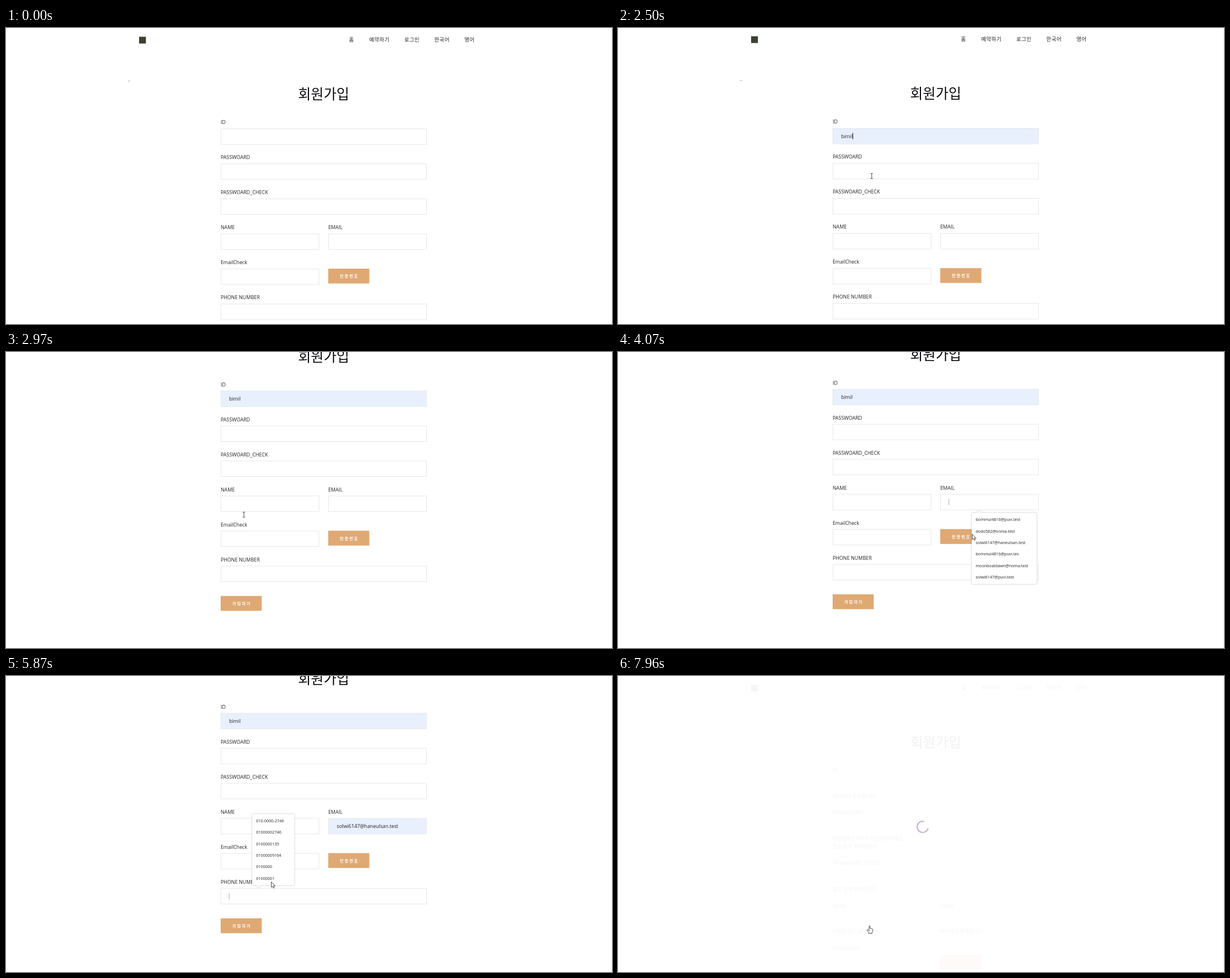
Recreate the animation shown at these times as an HTML page. Size 1070 by 524 pixels, loop 8 s.

```html
<!DOCTYPE html>
<html lang="ko">
<head>
<meta charset="utf-8">
<title>회원가입</title>
<style>
  html, body { margin: 0; width: 100%; height: 100%; overflow: hidden; background: #fff; }
  svg { display: block; width: 1070px; height: 524px; }
  text { font: 8.75px "Open Sans", "Noto Sans", "Noto Sans CJK KR", "Noto Sans CJK", sans-serif; fill: #222; white-space: pre; }
  .ko { font-family: "Noto Sans CJK KR", "Noto Sans CJK", sans-serif; }
  .title { font-size: 24.5px; font-weight: 350; fill: #0c0c10; text-anchor: middle; }
  .nav { font-size: 9.3px; font-weight: 350; letter-spacing: .45px; }
  .btn { font-size: 7.3px; font-weight: 700; letter-spacing: 1.7px; fill: #fff; text-anchor: middle; }
  .item { font-size: 7.1px; }
  .popup { filter: drop-shadow(0 .7px 1px rgba(0, 0, 0, .32)); }
</style>
</head>
<body>
<svg id="stage" viewBox="0 0 1070 524"></svg>
<script>
const LOOP = 8000, ROW = 20.3, RELOAD = 7570, BLINK = 530;
const stage = document.getElementById('stage');

function add(parent, tag, attrs = {}, label) {
  const el = document.createElementNS('http://www.w3.org/2000/svg', tag);
  set(el, attrs);
  if (label !== undefined) el.textContent = label;
  parent.appendChild(el);
  return el;
}
function set(el, attrs) {
  for (const k in attrs) el.setAttribute(k, attrs[k]);
}
function show(el, on) {
  el.style.display = on ? '' : 'none';
}
const group = parent => add(parent, 'g');
const write = (parent, x, y, label, cls = '') => add(parent, 'text', { x, y, class: cls }, label);

function header(parent) {
  add(parent, 'rect', { x: 235, y: 15.5, width: 12, height: 12, fill: '#39432f' });
  const nav = [[605.6, '홈'], [641.2, '예약하기'], [703.2, '로그인'], [756.2, '한국어'], [809.5, '영어']];
  for (const [x, label] of nav) write(parent, x, 24.2, label, 'ko nav');
  write(parent, 560.9, 126.2, '회원가입', 'ko title');
}

function button(parent, x, y, label) {
  add(parent, 'rect', { x, y, width: 72.5, height: 26.3, fill: '#dfa974' });
  write(parent, x + 37.2, y + 16.2, label, 'ko btn');
}

function field(parent, x, y, width, label) {
  write(parent, x, y - 7.8, label);
  const box = add(parent, 'rect', {
    x: x + .5, y: y + .5, width, height: 27.6, fill: '#fff', stroke: '#e7e7e7'
  });
  const value = write(parent, x + 15, y + 17.6, '');
  const caret = add(parent, 'rect', { x: x + 14.6, y: y + 8.5, width: 1, height: 11.5 });
  show(caret, false);
  return { x, box, value, caret };
}

// Sign-up form
const page = group(stage);
header(page);
add(page, 'rect', { x: 216.5, y: 93.2, width: 1.4, height: 1.4, fill: '#777' });
const idField = field(page, 379, 178, 363, 'ID');
field(page, 379, 240, 363, 'PASSWOARD');
field(page, 379, 302, 363, 'PASSWOARD_CHECK');
field(page, 379, 364, 173, 'NAME');
const emailField = field(page, 569, 364, 173, 'EMAIL');
field(page, 379, 426, 173, 'EmailCheck');
const phoneField = field(page, 379, 488, 363, 'PHONE NUMBER');
button(page, 569, 426, '인증번호');
button(page, 379, 541.5, '가입하기');

// Reloaded page, almost hidden by the white preloader
const reloaded = group(stage);
const faint = add(reloaded, 'g', { opacity: .05 });
header(faint);
const notes = [
  [379, 170, 'ID'], [379, 216, '아이디가 중복됩니다'], [379, 245, 'PASSWOARD'],
  [379, 291, '비밀번호는 8자리 이상 입력하세요'], [379, 305, '필수 입력 항목입니다'],
  [379, 334, 'PASSWOARD_CHECK'], [379, 380, '필수 입력 항목입니다'],
  [379, 410, 'NAME'], [569, 410, 'EMAIL'],
  [379, 455, '이름은 필수 항목입니다'], [569, 455, '이메일이 중복됩니다'],
  [379, 485, 'EmailCheck']
];
for (const n of notes) write(faint, ...n);
button(faint, 569, 494, '인증번호');
const ring = add(reloaded, 'circle', {
  r: 9.9, fill: 'none', 'stroke-width': 2.2, pathLength: 4, 'stroke-dasharray': '3 1'
});

add(stage, 'rect', { x: 1069, y: 0, width: 1, height: 524, fill: '#f1f1f1' });

// Autocomplete lists
function popup(opts) {
  const { x, y, width, rows, arrowY } = opts;
  const g = add(stage, 'g', { class: 'popup' });
  const height = rows.length * ROW + 4.6, dir = arrowY > y + height / 2 ? 4 : -4;
  add(g, 'rect', { x, y, width, height, rx: 2, fill: '#fff' });
  add(g, 'path', { d: `M${x + 7} ${arrowY}h10l-5 ${dir}z`, fill: '#fff' });
  const hover = add(g, 'rect', { x, width, height: ROW, fill: '#e8e8e8' });
  rows.forEach((r, i) => write(g, x + 7, y + 14.9 + i * ROW, r, 'item'));
  return { ...opts, g, hover, top: y + 2 };
}
const lists = [
  popup({
    field: idField, open: 1080, close: 1880, pick: 0, blinkFrom: 2100,
    x: 434.5, y: 211.5, width: 75, arrowY: 211.7,
    rows: ['bimil', 'bimil2', 'bimil12']
  }),
  popup({
    field: emailField, open: 3830, close: 4900, pick: 2, blinkFrom: 4900,
    x: 624.5, y: 284.4, width: 115, arrowY: 284.6,
    rows: ['bommul4816@puvi.test', 'dodo582@noma.test', 'solwi6147@haneulsan.test',
      'bommul4816@puvi.tes', 'moonboatdawn@noma.test', 'solwi6147@puvi.test']
  }),
  popup({
    field: phoneField, open: 5400, close: 6850, pick: 1, blinkFrom: 6850,
    x: 434.5, y: 244.2, width: 74.7, arrowY: 370.4,
    rows: ['010-0000-2746', '01000002746', '0100000135', '01000009164', '0100000', '01000001']
  })
];

// Pointer
const glow = add(stage, 'circle', { r: 8.3, fill: '#f5e51b', opacity: .8 });
const shapes = {
  arrow: 'M0 0V9.6L2.2 7.6L3.7 11L5.2 10.3L3.8 7.1H6.7Z',
  beam: 'M-2 -4.5H-.7L0 -4L.7 -4.5H2M0 -4V4M-2 4.5H-.7L0 4L.7 4.5H2',
  hand: 'M-.9 .3Q0 -.8 .9 .3V4.5Q2 3.8 2.6 4.8Q3.7 4.2 4.2 5.2Q5.6 4.8 5.6 6.4V9.2L4.4 11.2V13H-1.6V11.6L-4.6 7.4Q-4.4 5.6 -2.4 7L-.9 8.4Z'
};
const pointer = add(stage, 'path', { 'stroke-linejoin': 'round' });

// time, x, y, shape from then on
const path = [
  [370, 849, 498, 'arrow'], [620, 700, 380, 'arrow'], [880, 500, 218, 'arrow'],
  [1010, 452, 193, 'beam'], [1200, 452, 193, 'beam'],
  [1390, 455, 222, 'arrow'], [2080, 455, 222, 'beam'],
  [2500, 448, 262, 'beam'], [2840, 424, 286, 'beam'], [2970, 420, 288, 'beam'],
  [3150, 425, 287, 'arrow'], [3600, 637, 268, 'beam'], [3840, 637, 268, 'arrow'],
  [3980, 620, 300, 'arrow'], [4070, 625.5, 322.5, 'arrow'], [4340, 655, 336, 'arrow'],
  [4960, 655, 336, 'arrow'], [5280, 455, 390, 'beam'], [5610, 455, 390, 'arrow'],
  [5700, 466, 422, 'arrow'], [5870, 468.5, 364.5, 'arrow'], [6410, 463, 292, 'arrow'],
  [6480, 463, 292, 'arrow'], [6580, 460.5, 273.5, 'arrow'], [6820, 460.5, 273.5, 'arrow'],
  [7250, 444.2, 442.5, 'hand']
];
const scroll = [[2440, 0], [2500, .7], [2600, 22], [2720, 68], [2840, 99], [2970, 109.6], [3060, 112.5]];
const clicks = [[1060, 1180], [1790, 1900], [3790, 3900], [4820, 4930], [5370, 5480], [6600, 6800], [7340, 7450]];

const within = (t, a, b) => t >= a && t < b;
const lerp = (a, b, u) => a + (b - a) * u;
const smooth = u => u * u * (3 - 2 * u);

function sample(keys, t, ease) {
  if (t <= keys[0][0]) return keys[0].slice(1);
  const i = keys.findIndex(k => k[0] > t);
  if (i < 0) return keys[keys.length - 1].slice(1);
  const a = keys[i - 1], b = keys[i];
  const u = ease((t - a[0]) / (b[0] - a[0]));
  return a.slice(1).map((v, j) => typeof v === 'number' ? lerp(v, b[j + 1], u) : v);
}

// The highlight lags a little behind the pointer
function hoverRow(list, t) {
  const [x, y, shape] = sample(path, t - 60, smooth);
  const row = Math.floor((y - list.top) / ROW);
  const inside = shape === 'arrow' && x > list.x + 2 && x < list.x + list.width;
  return inside && row >= 0 && row < list.rows.length ? row : -1;
}

function drawList(list, i, t) {
  const { field: f, rows, open, close, blinkFrom } = list;
  const isOpen = within(t, open, close), done = t >= close;
  const row = isOpen ? hoverRow(list, t) : -1;
  show(list.g, isOpen);
  show(list.hover, row >= 0);
  if (row >= 0) set(list.hover, { y: list.top + row * ROW });

  const filled = done || row >= 0;
  f.value.textContent = done ? rows[list.pick] : rows[row] || '';
  f.value.style.fontSize = done ? '' : '7.35px';
  set(f.box, { fill: filled ? '#e8f0fe' : '#fff' });

  const next = lists[i + 1];
  const focused = t >= open && (!next || t < next.open);
  const since = t - (done ? blinkFrom : open);
  show(f.caret, focused && (since < 0 || Math.floor(since / BLINK) % 2 === 0));
  const end = done ? f.value.getComputedTextLength() : -.4;
  set(f.caret, { x: f.x + 15 + end, fill: filled ? '#222' : '#aaa' });
}

function drawRing(t) {
  const turn = Math.max(0, t - 7627) / 800 % 1;
  const u = 1 - Math.abs(1 - 2 * turn);
  const color = [[244, 103], [67, 58], [54, 183]].map(([a, b]) => Math.round(lerp(a, b, u)));
  set(ring, {
    stroke: `rgb(${color})`,
    opacity: lerp(1, .4, Math.min(1, Math.max(0, (t - 7730) / 230))),
    transform: `translate(538 267) rotate(${225 + turn * 360})`
  });
}

function drawPointer(t) {
  const [x, y, shape] = sample(path, t, smooth);
  const beam = shape === 'beam';
  show(pointer, t >= 370);
  set(pointer, {
    d: shapes[shape], transform: `translate(${x} ${y})`,
    fill: beam ? 'none' : '#fff', stroke: beam ? '#333' : '#222',
    'stroke-width': beam ? .9 : .8
  });
  show(glow, clicks.some(c => within(t, ...c)));
  set(glow, { cx: x + .7, cy: y + 1.5 });
}

function draw(t) {
  const fresh = t >= RELOAD;
  show(page, !fresh);
  show(reloaded, fresh);
  const [offset] = sample(scroll, t, u => u);
  set(page, { transform: `translate(0 ${-offset})` });
  lists.forEach((list, i) => drawList(list, i, t));
  drawRing(t);
  drawPointer(t);
}

const start = performance.now();
function tick() {
  draw((performance.now() - start) % LOOP);
  requestAnimationFrame(tick);
}
tick();
</script>
</body>
</html>
```
